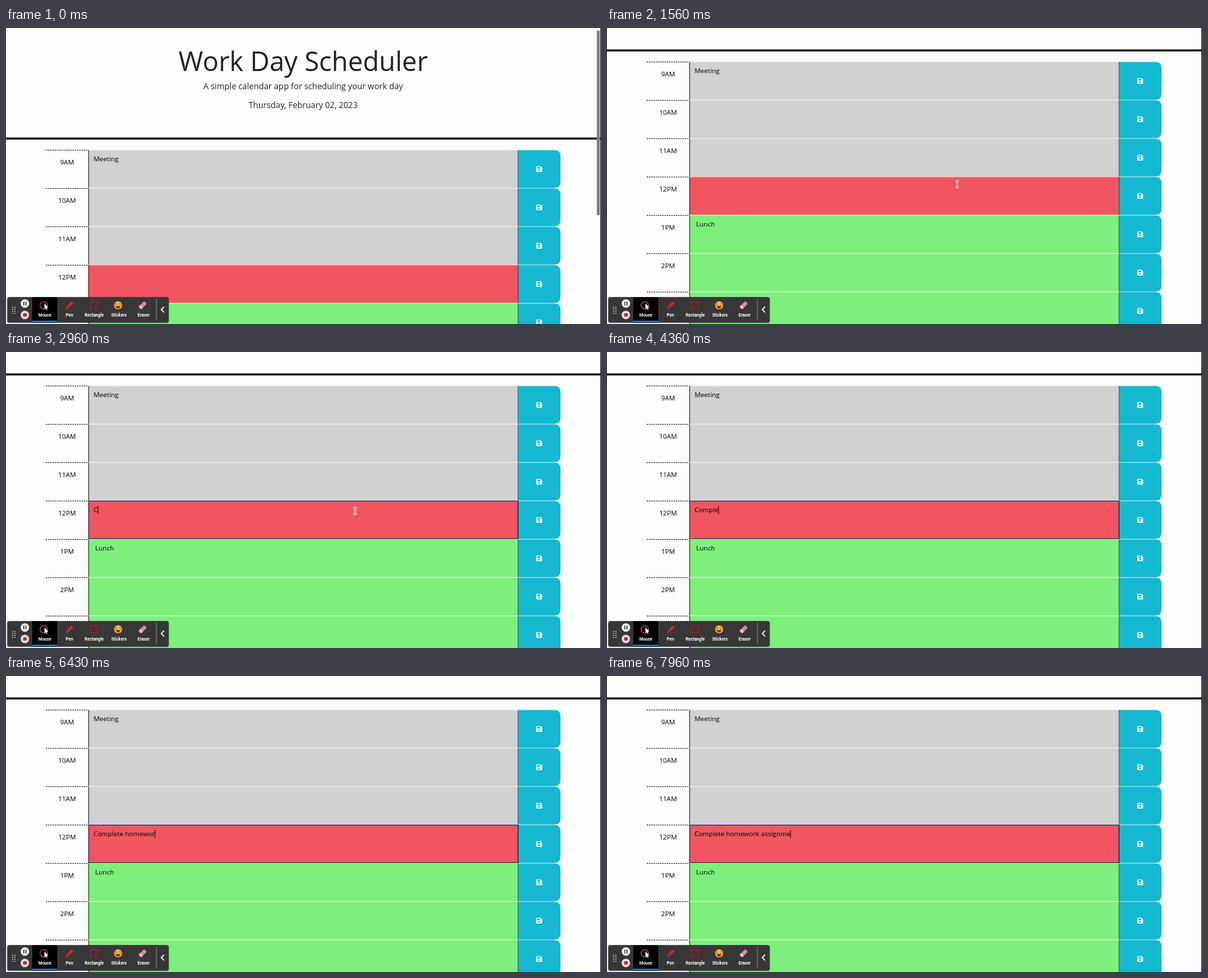
Animation, 882 px wide and 440 px high, one loop 8 s. Source, as an HTML page:

```html
<!DOCTYPE html>
<html lang="en">
<head>
<meta charset="utf-8">
<title>Work Day Scheduler</title>
<style>
html, body { margin: 0; width: 100%; height: 100%; overflow: hidden; background: #fdfdfd; }
svg { display: block; width: 882px; height: 440px; }
text { font-family: "Open Sans", "Noto Sans", sans-serif; font-size: 9.83px; white-space: pre; }
.mid { text-anchor: middle; }
.head { fill: #1f2226; font-size: 12.29px; }
.tools text { font: 500 6.3px Roboto, sans-serif; fill: #fff; text-anchor: middle; }
</style>
</head>
<body>
<svg viewBox="0 0 882 440">
  <defs>
    <g id="disk">
      <path d="M-3.4-4.3H2.2L4.3-2.2V3.4Q4.3 4.3 3.4 4.3H-3.4Q-4.3 4.3-4.3 3.4V-3.4Q-4.3-4.3-3.4-4.3Z" fill="#fff"/>
      <path d="M-3-3.1H1.7V-.7H-3Z" fill="#14b9d1"/>
      <circle cy="1.7" r="1.3" fill="#14b9d1"/>
    </g>
  </defs>
  <g id="page">
    <text class="head mid" x="440.5" y="63.5" style="font-size:39.3px">Work Day Scheduler</text>
    <text class="head mid" x="440.5" y="91">A simple calendar app for scheduling your work day</text>
    <text class="head mid" x="440.5" y="119">Thursday, February 02, 2023</text>
    <rect y="162.7" width="882" height="3.2" fill="#1c1f22"/>
    <g id="rows"></g>
    <g id="field">
      <rect x="122.5" y="352.5" width="636.5" height="56" fill="none" stroke="#1c2f63" stroke-width="1.1"/>
      <text id="typed" x="129.7" y="369.4"></text>
      <rect id="caret" y="360" width="1" height="12" fill="#111"/>
    </g>
  </g>
  <rect x="881" width="1" height="440" fill="#222"/>
  <rect id="thumb" x="875.8" width="4.4" height="275" rx="2.2" fill="#7d7d7d"/>
  <g id="pointer" fill="none">
    <path id="beam" d="M-2.2-5Q0-5 0-3.6Q0-5 2.2-5M0-3.6V3.6M-2.2 5Q0 5 0 3.6Q0 5 2.2 5M-1.2 1H1.2" stroke="#fff" stroke-width="2.2"/>
    <use href="#beam" style="stroke:#333"/>
    <path d="M-2.2-5Q0-5 0-3.6Q0-5 2.2-5M0-3.6V3.6M-2.2 5Q0 5 0 3.6Q0 5 2.2 5M-1.2 1H1.2" stroke="#555" stroke-width=".8"/>
  </g>
  <g class="tools">
    <rect x="1" y="399.5" width="241" height="40" rx="4" fill="#000" opacity=".18"/>
    <rect x="1.8" y="400" width="239.4" height="38" rx="3.5" fill="#373737"/>
    <rect x="39" y="400" width="37" height="38" fill="#000"/>
    <rect x="39" y="435.2" width="37" height="1.8" fill="#2196e3"/>
    <path d="M9.8 414.5V425M13.2 414.5V425" stroke="#c8c8c8" stroke-width="1.5" stroke-dasharray="1.5 1.5"/>
    <circle cx="28" cy="409.5" r="6.3" fill="#f1f1f1"/>
    <path d="M26.4 406.8V412.2M29.6 406.8V412.2" stroke="#333" stroke-width="1.5"/>
    <circle cx="28" cy="426.5" r="6.3" fill="#f1dcdc"/>
    <rect x="25.4" y="423.9" width="5.2" height="5.2" rx=".8" fill="#d5202c"/>
    <circle cx="56" cy="412.3" r="5.5" fill="none" stroke="#c95560" stroke-width="1.2"/>
    <path d="M57 409.2V418L59 416.2L60.3 419L61.6 418.4L60.3 415.7H62.8Z" fill="#fff"/>
    <g transform="translate(94 412.5) rotate(45)" fill="#e0222d">
      <rect x="-2" y="-6.5" width="4" height="8.5" rx=".8"/>
      <path d="M-2 2.7H2L.9 5.2V6.8H-.9V5.2Z"/>
    </g>
    <rect x="124.8" y="407" width="11" height="10.4" fill="none" stroke="#c2121f" stroke-width="1.3"/>
    <circle cx="166.2" cy="412.3" r="6" fill="#f8bd3c"/>
    <path d="M162 410.6Q163.4 408.6 164.8 410.6M167.6 410.6Q169 408.6 170.4 410.6" fill="none" stroke="#5b3518" stroke-width=".9"/>
    <path d="M162.8 413.3H169.6Q169 417 166.2 417T162.8 413.3Z" fill="#7a2a1c"/>
    <circle cx="161.8" cy="412.7" r="1.3" fill="#ee6a4c"/>
    <circle cx="170.6" cy="412.7" r="1.3" fill="#ee6a4c"/>
    <g transform="translate(202.6 412.2) rotate(-45)">
      <rect x="-6" y="-2.8" width="12" height="5.6" rx="1.2" fill="#d98a96"/>
      <rect x="-6" y="-2.8" width="4" height="5.6" rx="1.2" fill="#eeb9c0"/>
    </g>
    <text x="57.5" y="428.6" style="font-weight:700">Mouse</text>
    <text x="94" y="428.6" style="font-weight:700">Pen</text>
    <text x="130.8" y="428.6" style="font-weight:700">Rectangle</text>
    <text x="167.5" y="428.6" style="font-weight:700">Stickers</text>
    <text x="204" y="428.6" style="font-weight:700">Eraser</text>
    <path d="M223 402V435" stroke="#8a8a8a" stroke-width=".9"/>
    <path d="M234.3 414.3L230.3 418.5L234.3 422.7" fill="none" stroke="#fff" stroke-width="1.6"/>
  </g>
</svg>
<script>
const $ = id => document.getElementById(id);
const GRAY = '#d1d1d1', RED = '#f15660', GREEN = '#7df07b';
const hours = [
  ['9AM', GRAY, 'Meeting'], ['10AM', GRAY], ['11AM', GRAY], ['12PM', RED],
  ['1PM', GREEN, ' Lunch'], ['2PM', GREEN], ['3PM', GREEN]
];
$('rows').innerHTML = hours.map(([hour, color, note = ''], i) => `
  <g transform="translate(0 ${181 + i * 57})">
    <path d="M59 .5H122" stroke="#111" stroke-dasharray="2 1.3"/>
    <text class="mid" x="90.5" y="21.6">${hour}</text>
    <rect x="122.5" y=".5" width="637" height="56.2" fill="${color}"/>
    <path d="M122.6 .5V56.7M759.2 .5V56.7" stroke="#222"/>
    <text x="129.7" y="17.4">${note}</text>
    <path d="M759.7 .5H813Q822 .5 822 9.5V47.7Q822 56.7 813 56.7H759.7Z" fill="#14b9d1"/>
    <use href="#disk" x="790.3" y="28.7"/>
  </g>`).join('');

const phrase = 'Complete homework assignme';
const keyTimes = [2900, 3160, 3360, 3630, 4160, 4300, 4500, 4690, 4900, 5230, 5360, 5560,
  5960, 6160, 6300, 6430, 6560, 6700, 6900, 7030, 7160, 7300, 7430, 7560, 7760, 7900];
const SCROLL = 500, FOCUS = 2300;
// pointer stops: time, x, y
const stops = [[1360, 548, 216], [1550, 519, 232], [1640, 519, 232], [2160, 517.5, 236]];

const clamp = v => Math.min(1, Math.max(0, v));
const show = (id, on) => $(id).style.display = on ? '' : 'none';

function pointerAt(t) {
  let [, x, y] = stops[0];
  for (let i = 1; i < stops.length; i++) {
    const [t0, x0, y0] = stops[i - 1], [t1, x1, y1] = stops[i];
    if (t < t0) break;
    const k = clamp((t - t0) / (t1 - t0)), e = k * (2 - k);
    x = x0 + (x1 - x0) * e;
    y = y0 + (y1 - y0) * e;
  }
  return `translate(${x} ${y})`;
}

function draw() {
  const t = performance.now() % 8000;
  const scrolled = t >= SCROLL;
  $('page').setAttribute('transform', `translate(0 ${scrolled ? -131 : 0})`);
  $('thumb').setAttribute('y', scrolled ? 86.5 : 3.5);
  $('thumb').setAttribute('opacity', 1 - clamp((t - 1050) / 250));

  show('pointer', t >= stops[0][0] && t < keyTimes[1]);
  $('pointer').setAttribute('transform', pointerAt(t));

  show('field', t >= FOCUS);
  const count = keyTimes.filter(k => k <= t).length;
  $('typed').textContent = phrase.slice(0, count);
  const width = count && t >= FOCUS ? $('typed').getComputedTextLength() : 0;
  $('caret').setAttribute('x', 129.5 + width);
  show('caret', count || t < FOCUS + 500);
  requestAnimationFrame(draw);
}
draw();
</script>
</body>
</html>
```
